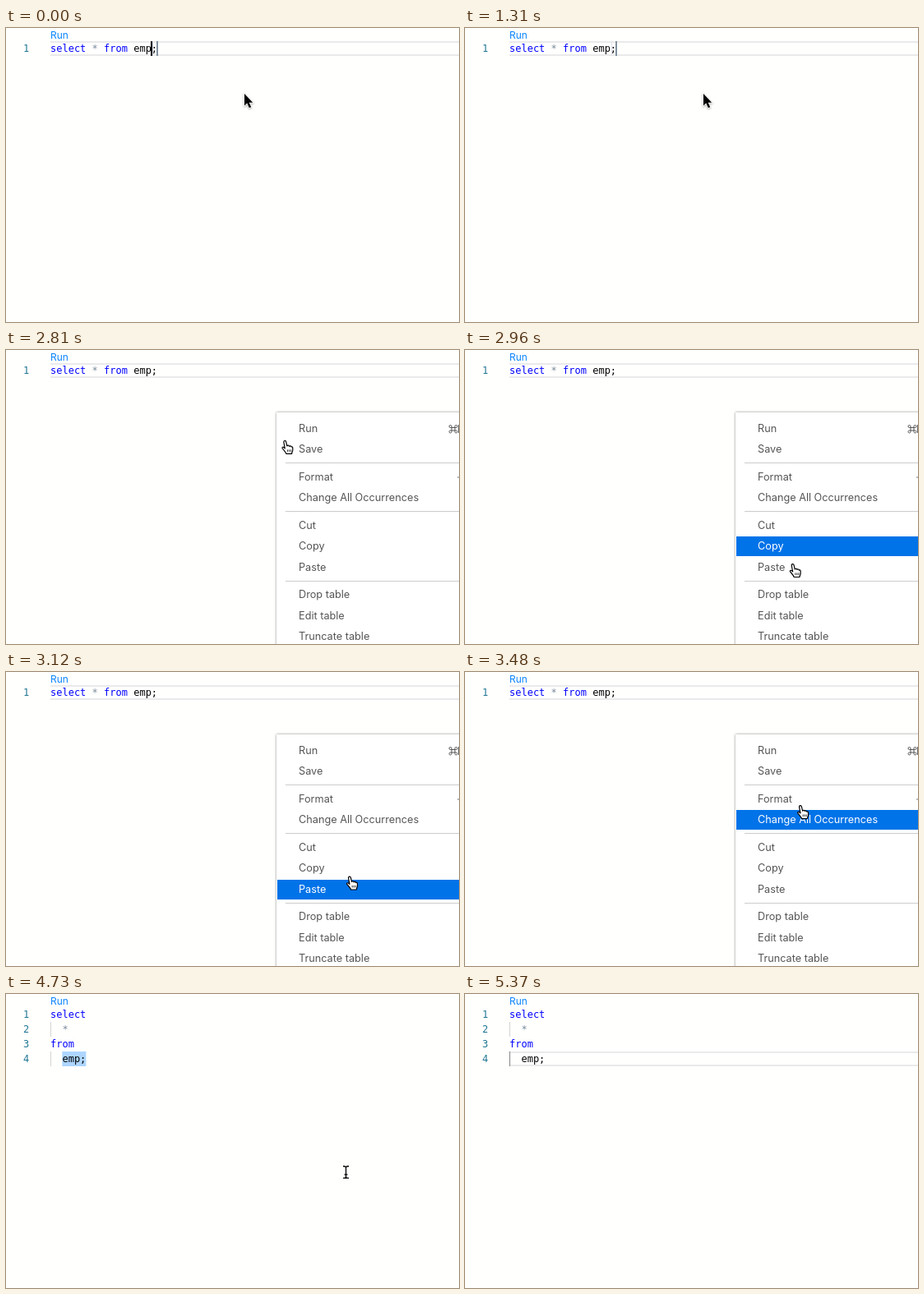
An HTML page that plays this animation: 551x358 px, repeating every 5.48 s.

```html
<!DOCTYPE html>
<html lang="en">
<head>
<meta charset="utf-8">
<title>SQL editor: format from the context menu</title>
<style>
  html, body { margin: 0; width: 100%; height: 100%; overflow: hidden; background: #fffffe; }
  svg { display: block; }
  text { white-space: pre; }
  .code { font: 12px "DejaVu Sans Mono", monospace; }
  .num { fill: #237893; }
  .key { fill: #00f; }
  .op { fill: #778899; }
  .lens { font: 12px Inter, sans-serif; fill: #0a84ff; }
  #menu { font: 12.7px Inter, sans-serif; fill: #555; }
  #panel { fill: #fff; filter: drop-shadow(0 0 1.5px #0007); }
  #menu .on { fill: #fff; }
  .line { fill: #eaeaea; }
  .guide { fill: #d3d3d3; }
  .ghost { fill: #8291a0; }
  .trace { fill: #dfe1ee; }
</style>
</head>
<body>
<svg width="551" height="358" viewBox="0 0 551 358">
  <text class="lens" x="54" y="12.5">Run</text>

  <g id="before">
    <path class="line" d="M54 16h497v2H54zM54 32h497v2H54z"/>
    <text class="code num" x="21" y="29">1</text>
    <g id="ghost">
      <rect class="trace" x="178" y="16" width="1" height="18"/>
      <rect class="ghost" x="183" y="16" width="2" height="18"/>
    </g>
    <text class="code" x="54" y="29"><tspan class="key">select</tspan> <tspan class="op">*</tspan> <tspan class="key">from</tspan> emp;</text>
    <rect id="caretMid" x="176" y="16" width="2" height="18"/>
    <rect id="caretEnd" x="183" y="16" width="2" height="18"/>
  </g>

  <g id="after">
    <path id="row" class="line" d="M54 70h497v2H54zM54 86h497v2H54z"/>
    <rect id="selection" x="68.400" y="70" width="29" height="18" fill="#add6ff"/>
    <rect class="guide" x="54" y="34" width="1" height="18"/>
    <rect id="guide" x="54" y="70" width="1" height="18"/>
    <g class="code">
      <g class="num">
        <text x="21" y="29">1</text><text x="21" y="47">2</text>
        <text x="21" y="65">3</text><text x="21" y="83">4</text>
      </g>
      <text class="key" x="54" y="29">select</text>
      <text class="op" x="54" y="47">  *</text>
      <text class="key" x="54" y="65">from</text>
      <text x="54" y="83">  emp;</text>
    </g>
    <rect id="caretNew" x="96" y="70" width="2" height="18"/>
  </g>

  <g id="menu">
    <rect id="panel" x="329" y="76" width="240" height="300"/>
    <path d="M340 137.500h211M340 196.500h211M340 281.500h211" stroke="#ccc"/>
    <rect id="hover" x="330" width="221" height="24" fill="#0073e8"/>
    <path d="M542 94.500h4v3.500h-4zM542 94.500h-1.500a1.500 1.500 0 1 1 1.500-1.500zM546 94.500v-1.500a1.500 1.500 0 1 1 1.500 1.500zM546 98h1.500a1.500 1.500 0 1 1-1.500 1.500zM542 98v1.500a1.500 1.500 0 1 1-1.500-1.500z"
      fill="none" stroke="#555"/>
    <text x="549" y="100.500">E</text>
    <path d="M549 155h2" stroke="#777"/>
  </g>

  <path id="arrow" d="M0 0v14.500l3.300-3 2.500 5.700 2.400-1-2.500-5.500h4.500z"
    stroke="#fff" stroke-width="1.600" paint-order="stroke" style="filter:drop-shadow(0 1px 1px #0005)"/>
  <g id="hand" fill="#fff" stroke="#000" stroke-width="1.200" stroke-linejoin="round">
    <path d="M4 10 2.600 2.600C2.200.4 4.900-.1 5.400 2L6.600 7.100C7.400 5.900 9 6.300 9.300 7.500 10.100 6.600 11.400 7 11.700 8.200 12.700 7.700 13.500 8.300 13.500 9.400V12c0 1.800-1.100 2.700-1.200 4.600H5.600C5 14.300 2.600 12.400.9 10 .2 8.800 1.500 7.900 2.500 8.700z"/>
    <path d="M7.200 11.500v2.600M9.200 11.500v2.600M11.200 11.500v2.600" stroke-width=".8"/>
  </g>
  <path id="beam" d="M-3.500-7.200h1.500Q0-7 0-5.500 0-7 2-7.200h1.500M0-5.500v11M-3.500 7.200h1.500Q0 7 0 5.500 0 7 2 7.200h1.500M-2 3h4"
    fill="none" stroke="#000" stroke-width="1.300"/>
</svg>

<script>
const LOOP = 5480;
const HOVER_LAG = 40;
const NS = "http://www.w3.org/2000/svg";
const el = id => document.getElementById(id);

const items = [
  ["Run", 96], ["Save", 121], ["Format", 155], ["Change All Occurrences", 180],
  ["Cut", 214], ["Copy", 239], ["Paste", 265],
  ["Drop table", 298], ["Edit table", 324], ["Truncate table", 349]
].map(([name, y]) => {
  const label = document.createElementNS(NS, "text");
  label.textContent = name;
  label.setAttribute("x", 356);
  label.setAttribute("y", y + 4.3);
  el("menu").append(label);
  return { label, y };
});

// Pointer paths as [ms, x, y]
const arrowPath = [[1670, 290, 80], [1760, 299, 84], [1860, 314, 84], [1980, 326, 76]];
const handPath = [
  [2780, 329, 90], [2810, 335, 109], [2870, 356, 168], [2930, 382, 235],
  [3000, 408, 280], [3040, 416, 285], [3080, 418, 272], [3120, 414, 249],
  [3180, 410, 210], [3240, 409, 182], [3360, 409, 182], [3480, 404, 162],
  [3710, 402, 154]
];
const beamPath = [
  [4350, 407, 157], [4480, 408, 174], [4700, 413, 214], [4870, 415, 225],
  [4920, 415, 225], [4950, 419, 231], [4980, 437, 258], [5010, 470, 300],
  [5040, 509, 350], [5070, 545, 400]
];

// Hermite curve through timed points, at rest at both ends and in pauses
function along(path, t) {
  const last = path.length - 1;
  if (t <= path[0][0]) return path[0].slice(1);
  if (t >= path[last][0]) return path[last].slice(1);
  const i = path.findIndex(p => p[0] > t) - 1;
  const a = path[i], b = path[i + 1], d = b[0] - a[0], u = (t - a[0]) / d;
  const slope = (j, k) => {
    if (j === 0 || j === last) return 0;
    const p = path[j - 1], q = path[j], r = path[j + 1];
    const s1 = (q[k] - p[k]) / (q[0] - p[0]), s2 = (r[k] - q[k]) / (r[0] - q[0]);
    return s1 * s2 > 0 ? 2 * s1 * s2 / (s1 + s2) : 0;
  };
  return [1, 2].map(k => {
    const v = u * u * (3 - 2 * u);
    return a[k] + (b[k] - a[k]) * v
      + d * u * (1 - u) * (slope(i, k) * (1 - u) - slope(i + 1, k) * u);
  });
}

const within = (t, ...spans) => spans.some(([a, b]) => t >= a && t < b);
const show = (id, on) => { el(id).style.display = on ? "" : "none"; };
const place = (id, [x, y]) => el(id).setAttribute("transform", `translate(${x} ${y})`);

function draw(t) {
  const formatted = t >= 3970;
  show("before", !formatted);
  show("after", formatted);
  show("ghost", t < 2250);
  show("caretMid", within(t, [0, 330], [810, 1310], [1810, 2250]));
  show("caretEnd", within(t, [2250, 2580]));

  const clicked = t >= 4870;
  show("selection", within(t, [4000, 4870]));
  show("row", clicked);
  el("guide").setAttribute("fill", clicked ? "#858585" : "#d3d3d3");
  show("caretNew", within(t, [4000, 4500], [4870, 5370]));

  show("menu", within(t, [2580, 3910]));
  el("menu").style.opacity = t < 2610 ? 0.5 : 1;
  const aim = along(handPath, t - HOVER_LAG)[1] + 3;
  const hot = t - HOVER_LAG >= 2780 && items.find(m => Math.abs(aim - m.y) <= 12);
  show("hover", hot);
  if (hot) el("hover").setAttribute("y", hot.y - 12);
  for (const m of items) m.label.classList.toggle("on", m === hot);

  show("arrow", t < 2780);
  show("hand", within(t, [2780, 3910]));
  show("beam", within(t, [3910, 5070]));
  place("arrow", along(arrowPath, t));
  place("hand", along(handPath, t));
  place("beam", along(beamPath, t));
}

function tick() {
  draw(performance.now() % LOOP);
  requestAnimationFrame(tick);
}
tick();
</script>
</body>
</html>
```
